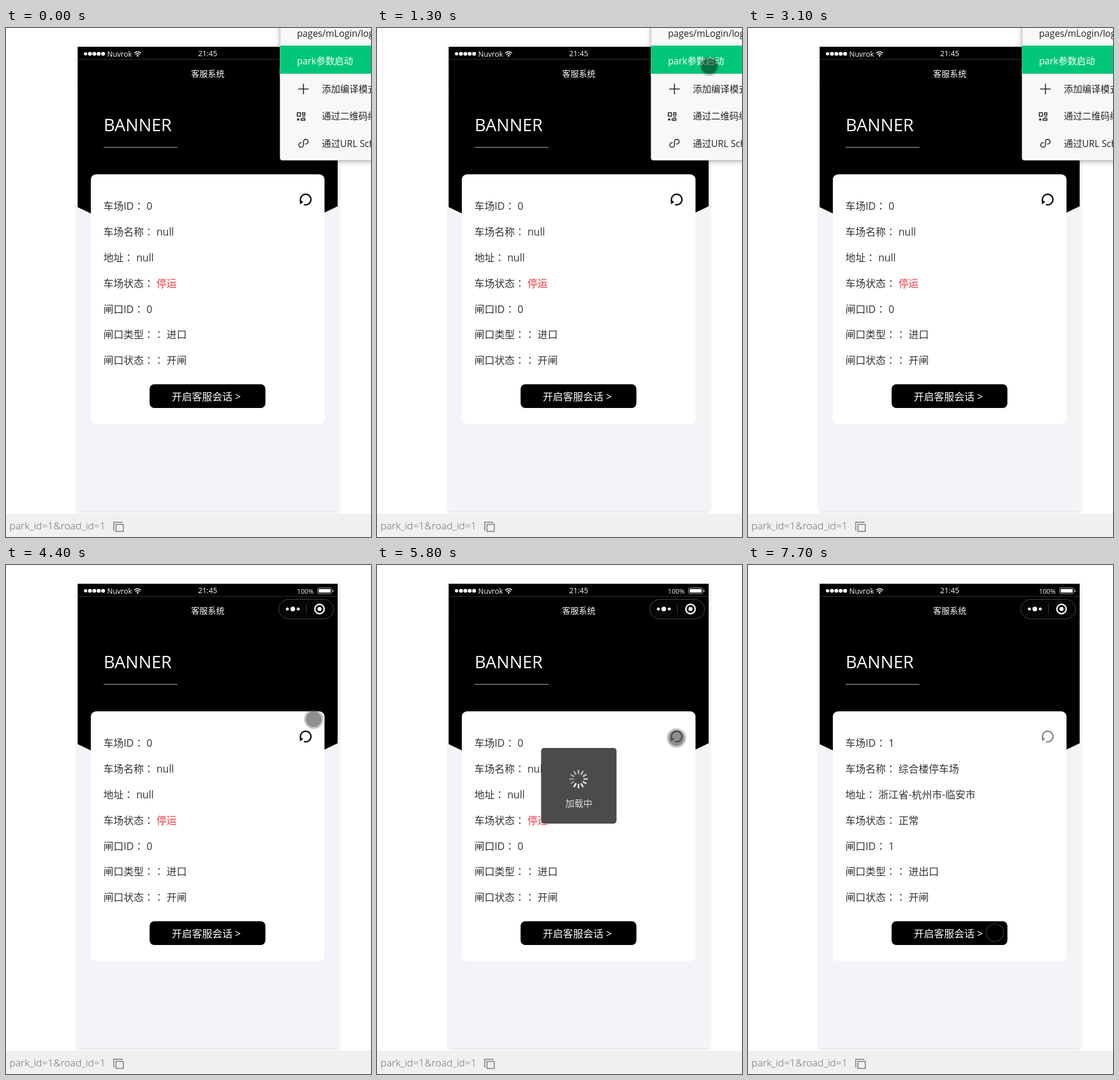
Write an HTML page that moves like this. It is 624 by 868 pixels and loops after 8 s.

```html
<!DOCTYPE html>
<html lang="zh-CN">
<head>
<meta charset="utf-8">
<style>
html, body { margin: 0; width: 100%; height: 100%; overflow: hidden; background: #fff; }
svg { display: block; width: 100%; height: 100%; }
text { font-family: "Open Sans", "Noto Sans CJK SC", sans-serif; white-space: pre; }
.row { font-size: 17.25px; fill: #333; }
.colon { font-family: "Noto Sans CJK JP", sans-serif; font-kerning: none; font-feature-settings: "chws" 0, "halt" 0, "palt" 0; text-spacing-trim: space-all; }
.item { font-size: 15.7px; fill: #222; }
.mid { text-anchor: middle; }
.line { fill: none; stroke-linecap: round; stroke-linejoin: round; }
</style>
</head>
<body>
<svg viewBox="0 0 624 868">
  <defs>
    <filter id="soft" x="-10%" y="-10%" width="120%" height="120%">
      <feDropShadow dx="0" dy="1" stdDeviation="3" flood-opacity=".16"/>
    </filter>
    <filter id="deep" x="-20%" y="-20%" width="140%" height="140%">
      <feDropShadow dx="0" dy="2" stdDeviation="4" flood-opacity=".3"/>
    </filter>
  </defs>

  <rect x="122.500" y="32" width="445" height="792" fill="#fff" filter="url(#soft)"/>

  <g id="page">
    <rect x="122.500" y="100" width="444.500" height="724" fill="#f3f4f8"/>
    <path d="M122.500 100H567V304L344.500 411L122.500 305.500Z"/>
    <text x="167" y="175.500" font-size="29.500" fill="#fff">BANNER</text>
    <path d="M167 203.500H293" stroke="#b4b4b4"/>
    <rect x="145" y="249.500" width="399.500" height="426" rx="9" fill="#fff"/>
    <g id="rows"></g>
    <g id="refresh">
      <path class="line" d="M503.500 294A9 9 0 1 1 510.500 301.300" stroke="#111" stroke-width="2.500"/>
      <path d="M501.800 293L508.300 296.500L502.800 300.800Z" fill="#111"/>
    </g>
    <rect x="245.500" y="607.500" width="198" height="40.500" rx="8"/>
    <text x="283.500" y="635" font-size="17.250" fill="#fff">开启客服会话 &gt;</text>
  </g>

  <rect x="122.500" y="32" width="444.500" height="69"/>
  <path d="M122.500 53.500H567" stroke="#333"/>
  <g id="signal" fill="#fff"></g>
  <text x="173" y="48.500" font-size="12.500" font-weight="500" fill="#fff">Nuvrok</text>
  <g class="line" stroke="#fff" stroke-width="1.400">
    <path d="M219.500 42.500Q225 38.500 230.500 42.500M221.500 45Q225 42.500 228.500 45"/>
    <circle cx="225" cy="47.300" r=".8"/>
  </g>
  <text class="mid" x="344.800" y="48.300" font-size="12.800" font-weight="500" fill="#fff">21:45</text>
  <text class="mid" x="345" y="83" font-size="14.200" font-weight="500" fill="#fff">客服系统</text>
  <text x="497.500" y="48.500" font-size="11.200" font-weight="500" fill="#fff">100%</text>
  <rect x="532.500" y="39" width="24.500" height="10" rx="2.500" fill="none" stroke="#aaa"/>
  <rect x="534.500" y="41" width="20.500" height="6" rx="1" fill="#fff"/>
  <path d="M559 42.500V46" stroke="#ccc" stroke-width="1.500"/>

  <g fill="#fff">
    <rect x="466.500" y="58.500" width="93.500" height="33.500" rx="16.750" fill="#050505" stroke="#484848"/>
    <circle cx="481" cy="75" r="2.500"/><circle cx="490.300" cy="75" r="4"/><circle cx="499.600" cy="75" r="2.500"/>
    <path d="M513.500 66V84" stroke="#3a3a3a"/>
    <circle cx="536" cy="75" r="8" fill="none" stroke="#fff" stroke-width="2.400"/>
    <circle cx="536" cy="75" r="3.600"/>
  </g>

  <g id="home">
    <circle cx="150" cy="77.200" r="17.500" fill="#c3c3c3"/>
    <path class="line" d="M141.500 77.500L150 69L158.500 77.500H155.500V85.500H152V80.500H148V85.500H144.500V77.500Z" stroke="#fff" stroke-width="1.600"/>
  </g>

  <g id="toast">
    <rect x="280.500" y="312" width="129" height="129" rx="5" fill="#4b4b4b"/>
    <g id="spinner" stroke="#fff" stroke-width="2.600" stroke-linecap="round"></g>
    <text class="mid" x="345" y="412" font-size="15.300" fill="#dedede">加载中</text>
  </g>

  <rect y="828.500" width="624" height="40" fill="#f0f0f0"/>
  <text x="6" y="855" font-size="17.200" font-weight="300" fill="#666">park_id=1&amp;road_id=1</text>
  <g fill="none" stroke="#777" stroke-width="1.500">
    <path d="M185.500 856H184.300V842.800H198V844"/>
    <rect x="188" y="846.500" width="12.500" height="12"/>
  </g>

  <g id="menu">
    <rect x="468.500" y="-20" width="240" height="245.500" rx="4" fill="#f7f9f9" stroke="#bbb" stroke-width=".8" filter="url(#deep)"/>
    <rect x="468.500" y="30" width="160" height="48" fill="#00c777"/>
    <text class="item" x="497.500" y="14.500">pages/mLogin/login</text>
    <text class="item" x="497.500" y="62" style="fill:#fff">park参数启动</text>
    <text class="item" x="540" y="109.500">添加编译模式</text>
    <text class="item" x="540" y="155.500">通过二维码编译</text>
    <text class="item" x="540" y="202.500">通过URL Scheme启动</text>
    <g class="line" stroke="#222" stroke-width="1.600">
      <path d="M500 104H517M508.500 95.500V112.500"/>
      <path d="M498 144.500H503.500V150.500H498ZM507 144.500H511V148.500H507ZM498.500 155H500.500V157H498.500ZM504.500 154.500H511V157.500H504.500ZM507 151.500H511"/>
      <path d="M505 195.500H504A4 4 0 1 0 508.500 199.500V194A4 4 0 1 1 513 197.800H512"/>
    </g>
  </g>

  <g id="cursor">
    <circle r="13.500" fill-opacity=".44"/>
    <circle r="15" fill="none" stroke="#525252" stroke-opacity=".32" stroke-width="3"/>
  </g>
</svg>

<script>
const LOOP = 8000, STEP = 100;
const NS = "http://www.w3.org/2000/svg";
const $ = id => document.getElementById(id);

function add(parent, tag, attrs, text = "") {
  const el = document.createElementNS(NS, tag);
  for (const k in attrs) el.setAttribute(k, attrs[k]);
  el.textContent = text;
  parent.append(el);
  return el;
}

// label, colon, value before and after loading
const fields = [
  ["车场ID", "：", "0", "1"],
  ["车场名称", "：", "null", "综合楼停车场"],
  ["地址", "：", "null", "浙江省-杭州市-临安市"],
  ["车场状态", "：", "停运", "正常"],
  ["闸口ID", "：", "0", "1"],
  ["闸口类型", "：：", "进口", "进出口"],
  ["闸口状态", "：：", "开闸", "开闸"]
];
const values = fields.map(([label, colon], i) => {
  const row = add($("rows"), "text", { class: "row", x: 166.5, y: 310.3 + i * 43.8 });
  add(row, "tspan", {}, label);
  // the Japanese form centres the colon in its cell
  for (const c of colon) add(row, "tspan", { class: "colon", lang: "ja" }, c);
  return add(row, "tspan", {});
});

for (let i = 0; i < 5; i++)
  add($("signal"), "circle", { cx: 136 + i * 7.5, cy: 44, r: i ? 3.3 : 2.8 });

const spokes = Array.from({ length: 12 }, (_, i) =>
  add($("spinner"), "path", { d: "M0 -9.500V-14.800", transform: `translate(344.5 365) rotate(${i * 30})` }));

// pointer strokes: each a list of [time, x, y]
const strokes = [
  [[1300, 568, 65], [1500, 545, 200], [1800, 466, 370], [2000, 466, 370], [2100, 460, 349],
   [2400, 483, 328], [2500, 483, 328], [2600, 502, 319], [2700, 502, 319], [3000, 606, 65], [3100, 640, 65]],
  [[3700, 608, 110], [4000, 580, 150], [4400, 526, 263], [4500, 517, 292], [4600, 515, 301], [4800, 512, 295],
   [6500, 512, 295], [6900, 395, 488], [7100, 395, 488], [7200, 391, 490], [7500, 443, 575], [7700, 422, 627], [8000, 422, 627]]
];

function pointer(t) {
  const path = strokes.find(s => t >= s[0][0] && t < s[s.length - 1][0]);
  if (!path) return null;
  const i = path.findIndex(p => p[0] > t);
  const [t0, x0, y0] = path[i - 1], [t1, x1, y1] = path[i];
  const k = (t - t0) / (t1 - t0);
  return [x0 + (x1 - x0) * k, y0 + (y1 - y0) * k];
}

const clamp = v => Math.max(0, Math.min(1, v));
const show = (id, on) => $(id).setAttribute("visibility", on ? "visible" : "hidden");

function draw(time) {
  const t = Math.floor(time / STEP) * STEP;
  const blank = t >= 700 && t < 1200;
  const loaded = t >= 6000;
  show("page", !blank);
  show("home", blank);
  show("menu", t < 4000);
  $("refresh").setAttribute("opacity", t >= 5100 ? 0.5 : 1);

  values.forEach((el, i) => {
    el.textContent = " " + fields[i][loaded ? 3 : 2];
    el.setAttribute("fill", i === 3 && !loaded ? "#f5333f" : "#333");
  });

  $("toast").setAttribute("opacity", Math.min(clamp((t - 5000) / 300), clamp((6300 - t) / 400)));
  const head = 7 + (t - 5800) / 100;
  spokes.forEach((el, i) => {
    const age = (((head - i) % 12) + 12) % 12;
    el.setAttribute("opacity", 1 - age * 0.058);
  });

  const p = pointer(t);
  show("cursor", p);
  if (p) $("cursor").setAttribute("transform", `translate(${p[0]} ${p[1]})`);
}

const start = performance.now();
function tick() {
  draw((performance.now() - start) % LOOP);
  requestAnimationFrame(tick);
}
tick();
</script>
</body>
</html>
```
